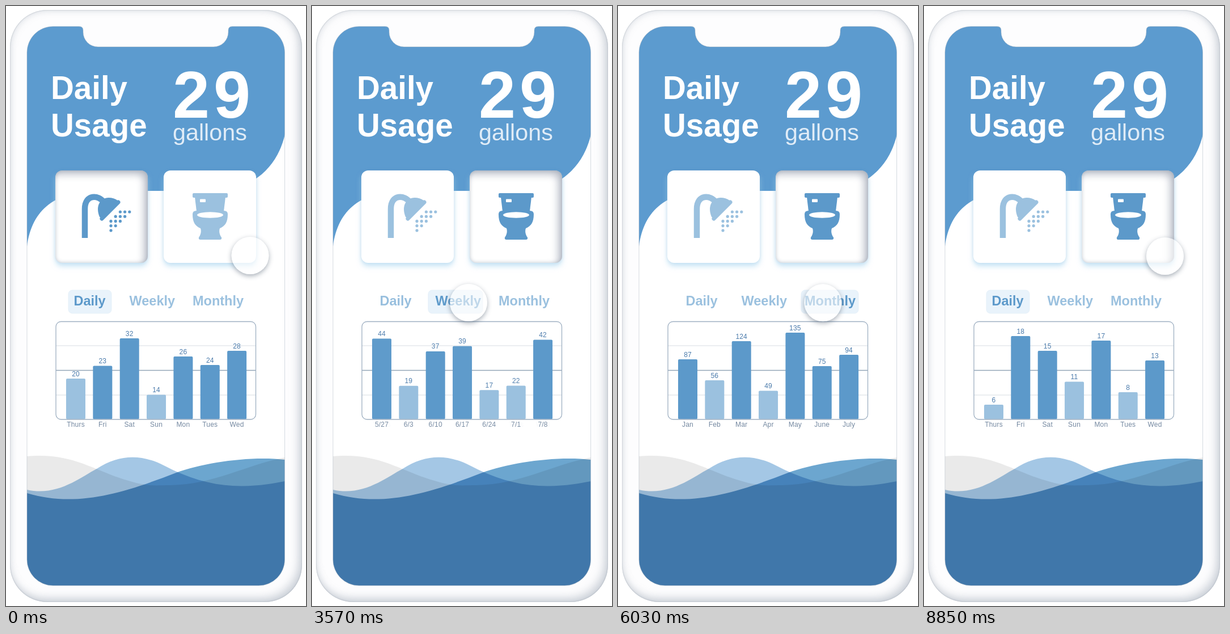
Animation of 529x1058 px, one loop 9 s. Source, as an HTML page:

```html
<!DOCTYPE html>
<html lang="en">
<head>
<meta charset="utf-8">
<title>Daily water usage</title>
<style>
  html, body { margin: 0; width: 100%; height: 100%; overflow: hidden; background: #fff; }
  body { position: relative; font-family: "Liberation Sans", Arial, sans-serif; }
  svg, .phone, .tile, .press, #cursor { position: absolute; }
  svg { left: 0; top: 0; }
  .phone {
    left: 7px; top: 7px; width: 515px; height: 1044px; border-radius: 66px; background: #fdfdfe;
    box-shadow: inset 0 0 2px rgba(120,132,145,.6), inset 0 0 14px rgba(150,161,174,.35),
                inset -7px -8px 16px rgba(150,161,174,.35);
  }
  .tile {
    top: 289.5px; width: 163px; height: 163px; border-radius: 12px; background: #fff;
    box-shadow: 0 6px 10px rgba(165,212,240,.6), 0 0 5px rgba(70,110,150,.15);
  }
  .press {
    inset: 0; border-radius: 12px;
    box-shadow: inset -7px 7px 13px rgba(95,108,130,.42), inset 0 0 6px rgba(95,108,130,.3);
  }
  #cursor {
    left: -33px; top: -33px; width: 66px; height: 66px; border-radius: 50%;
    background: rgba(255,255,255,.6); box-shadow: 0 3px 8px rgba(60,75,95,.45);
  }
  .wave { mix-blend-mode: multiply; }
  .bold { font-weight: bold; }
  #chart text { font-size: 12px; letter-spacing: .2px; text-anchor: middle; }
</style>
</head>
<body>
<div class="phone"></div>
<svg width="529" height="1058">
  <defs>
    <path id="screen" d="M83 36H129Q136 36 136 43V46A26 26 0 0 0 162 72H366A26 26 0 0 0 392 46V43Q392 36 399 36H445.5A46 46 0 0 1 491.5 82V976A46 46 0 0 1 445.5 1022H83A46 46 0 0 1 37 976V82A46 46 0 0 1 83 36Z"/>
    <clipPath id="clip"><use href="#screen"/></clipPath>
  </defs>
  <g clip-path="url(#clip)" style="isolation:isolate">
    <path fill="#fff" d="M37 36H492V1022H37Z"/>
    <path fill="#5c9bcf" d="M37 36H492V226C478 287 432 326 365 326H165C87 326 46 358 37 424Z"/>
    <path class="wave" fill="#eaeaea" d="M37 794C110 787 150 815 200 832S260 845 290 845C370 843 420 810 492 796V1022H37Z"/>
    <path class="wave" fill="#a4c7e5" d="M37 853C90 865 130 832 160 816C200 790 240 790 280 811S360 844 400 846S470 842 492 838V1022H37Z"/>
    <path class="wave" fill="#6ca6cf" d="M37 859C120 884 200 862 300 823C350 805 430 793 492 800V1022H37Z"/>
  </g>
  <use href="#screen" fill="none" stroke="#a9b4bf" stroke-opacity=".6" stroke-width=".8"/>
  <g fill="#fff" class="bold">
    <text x="79" y="163.500" font-size="56.500">Daily</text>
    <text x="79" y="230" font-size="56.500">Usage</text>
    <text x="294" y="197" font-size="117" letter-spacing="7">29</text>
  </g>
  <text x="294" y="236.500" font-size="41.300" fill="#e0ecf7">gallons</text>
</svg>

<div class="tile" style="left:87px"><div class="press"></div></div>
<div class="tile" style="left:278px"><div class="press"></div></div>

<svg width="529" height="1058">
  <g class="icon">
    <path d="M139 409V358C139 331 164 333 172 346" fill="none" stroke="currentColor" stroke-width="10.500"/>
    <path d="M165 372C157 353 166 338 181 338Q190 338 197 343L198 347L170 375Z" fill="currentColor"/>
    <path d="M169 375L198 346" stroke="currentColor" stroke-width="7" stroke-linecap="round"/>
    <g id="drops" fill="currentColor"></g>
  </g>
  <g class="icon" fill="currentColor">
    <rect x="329" y="330" width="62" height="8" rx="2"/>
    <path d="M333 337H387L384 362H336Z"/>
    <path d="M329 367Q329 361 336 361H384Q391 361 391 367C391 382 386 388 377 392C375 398 377 404 380 408Q381 412 377 412H343Q339 412 340 408C343 404 345 398 343 392C334 388 329 382 329 367Z"/>
    <rect x="342" y="340.500" width="10" height="5.500" rx="1" fill="#fff"/>
    <ellipse cx="360" cy="368.500" rx="23" ry="5.200" fill="#fff"/>
  </g>
  <rect id="pill" y="501" height="41" rx="7" fill="#e9f3fb" stroke="#e0edf7" stroke-width=".7"/>
  <g class="bold" font-size="23.500">
    <text class="tab" x="119.500" y="527.500">Daily</text>
    <text class="tab" x="217.500" y="527.500">Weekly</text>
    <text class="tab" x="329" y="527.500">Monthly</text>
  </g>
  <path d="M88 599H440M88 686H440" stroke="#d8dde3" stroke-width="1.200"/>
  <path d="M88 642.500H440" stroke="#94a6b8" stroke-width="1.400"/>
  <g id="chart"></g>
  <rect x="88" y="556.500" width="352.500" height="172.500" rx="9" fill="none" stroke="#9fb0c2" stroke-width="1.300"/>
</svg>
<div id="cursor"></div>

<script>
const LOOP = 9000, LAST = 8850, STEP = 30, FADE = 500;
const BASE = 728.5, BAR_WIDTH = 34, BAR_GAP = 47.35;
const DARK = [92, 153, 202], LIGHT = [155, 193, 223];
const DAYS = "Thurs Fri Sat Sun Mon Tues Wed".split(" ");
const PILLS = [[110, 76], [209, 97], [323, 101]];

const view = (tile, tab, names, values, tops, pale) => ({ tile, tab, names, values, tops, pale });
const shower = view(0, 0, DAYS, [20, 23, 32, 14, 26, 24, 28],
  [657, 634.5, 586, 685.5, 618, 633, 608], [0, 3]);
const daily = view(1, 0, DAYS, [6, 18, 15, 11, 17, 8, 13],
  [703, 582, 608, 662.5, 590, 681, 625], [0, 3, 5]);
const weekly = view(1, 1, "5/27 6/3 6/10 6/17 6/24 7/1 7/8".split(" "), [44, 19, 37, 39, 17, 22, 42],
  [581.5, 673.5, 609, 597, 681, 669, 587], [1, 4, 5]);
const monthly = view(1, 2, "Jan Feb Mar Apr May June July".split(" "), [87, 56, 124, 49, 135, 75, 94],
  [623, 660, 591, 678.5, 576, 635, 615], [1, 3]);

// Each tap switches to the next view.
const taps = [[0, shower], [1460, daily], [3150, weekly], [4895, monthly], [7300, daily]];
// Cursor moves: start, end, destination.
const moves = [[0, 0, 430.5, 440], [1980, 2790, 276, 523], [3650, 4320, 377, 523],
  [5900, 6700, 155, 525], [8000, 8850, 425, 441]];

const $ = id => document.getElementById(id);
const all = selector => [...document.querySelectorAll(selector)];
const lerp = (a, b, p) => a + (b - a) * p;
const clamp = v => Math.max(0, Math.min(1, v));
const smooth = p => p * p * (3 - 2 * p);
const tint = p => `rgb(${LIGHT.map((c, i) => lerp(c, DARK[i], p))})`;
const set = (el, attrs) => { for (const k in attrs) el.setAttribute(k, attrs[k]); };

function add(parent, tag, attrs) {
  const el = document.createElementNS("http://www.w3.org/2000/svg", tag);
  set(el, attrs);
  return parent.appendChild(el);
}

// Ease-out along cubic-bezier(0, 0, .58, 1).
function easeOut(x) {
  let lo = 0, hi = 1;
  for (let i = 0; i < 16; i++) {
    const s = (lo + hi) / 2;
    if (1.74 * (1 - s) * s * s + s ** 3 < x) lo = s; else hi = s;
  }
  return 3 * lo * lo - 2 * lo ** 3;
}

for (let row = 0; row < 5; row++)
  for (let col = Math.max(0, 2 - row); row + col < 5; col++)
    add($("drops"), "circle", { cx: 185 + 8.2 * col, cy: 363 + 8.2 * row, r: 2.6 });

const columns = DAYS.map((_, i) => {
  const x = 106 + BAR_GAP * i, middle = x + BAR_WIDTH / 2;
  const layer = () => ({
    bar: add($("chart"), "rect", { x, width: BAR_WIDTH, rx: 2 }),
    value: add($("chart"), "text", { x: middle, fill: "#4a7aab" }),
    name: add($("chart"), "text", { x: middle, y: 742, fill: "#7488a0" })
  });
  return { old: layer(), now: layer() };
});
const icons = all(".icon"), presses = all(".press"), tabs = all(".tab");

function drawLayer(layer, state, i, top, color, barAlpha, textAlpha, nameAlpha) {
  set(layer.bar, { y: top, height: BASE - top, fill: color, opacity: barAlpha });
  set(layer.value, { y: top - 4.5, opacity: textAlpha });
  set(layer.name, { opacity: nameAlpha });
  layer.value.textContent = state.values[i];
  layer.name.textContent = state.names[i];
}

// Bars cross-fade between tiles and change height between tabs.
function drawChart(from, to, p) {
  const dissolve = from.tile !== to.tile;
  columns.forEach(({ old, now }, i) => {
    const shade = state => state.pale.includes(i) ? 0 : 1;
    const top = lerp(from.tops[i], to.tops[i], p);
    const color = tint(lerp(shade(from), shade(to), p));
    const sameName = from.names === to.names;
    drawLayer(old, from, i, dissolve ? from.tops[i] : top, dissolve ? tint(shade(from)) : color,
      dissolve ? 1 - p : 0, 1 - p, sameName ? 0 : 1 - p);
    drawLayer(now, to, i, dissolve ? to.tops[i] : top, dissolve ? tint(shade(to)) : color,
      dissolve ? p : 1, p, sameName ? 1 : p);
  });
}

function draw(t) {
  const current = taps.findLastIndex(([start]) => t >= start);
  const [start, to] = taps[current];
  const from = current ? taps[current - 1][1] : to;
  const p = current ? easeOut(clamp((t - start) / FADE)) : 1;
  const active = (key, i) => lerp(+(from[key] === i), +(to[key] === i), p);

  icons.forEach((icon, i) => icon.style.color = tint(active("tile", i)));
  presses.forEach((press, i) => press.style.opacity = active("tile", i));
  tabs.forEach((tab, i) => set(tab, { fill: tint(active("tab", i)) }));
  const [x, width] = PILLS[from.tab].map((v, i) => lerp(v, PILLS[to.tab][i], p));
  set($("pill"), { x, width });
  drawChart(from, to, p);

  let [, , cx, cy] = moves[0];
  for (const [begin, end, x, y] of moves.slice(1)) {
    const q = smooth(clamp((t - begin) / (end - begin)));
    cx = lerp(cx, x, q);
    cy = lerp(cy, y, q);
  }
  $("cursor").style.transform = `translate(${cx}px, ${cy}px)`;
}

const origin = performance.now();
function tick() {
  const t = (performance.now() - origin) % LOOP;
  draw(Math.min(LAST, Math.floor(t / STEP) * STEP));
  requestAnimationFrame(tick);
}
tick();
</script>
</body>
</html>
```
